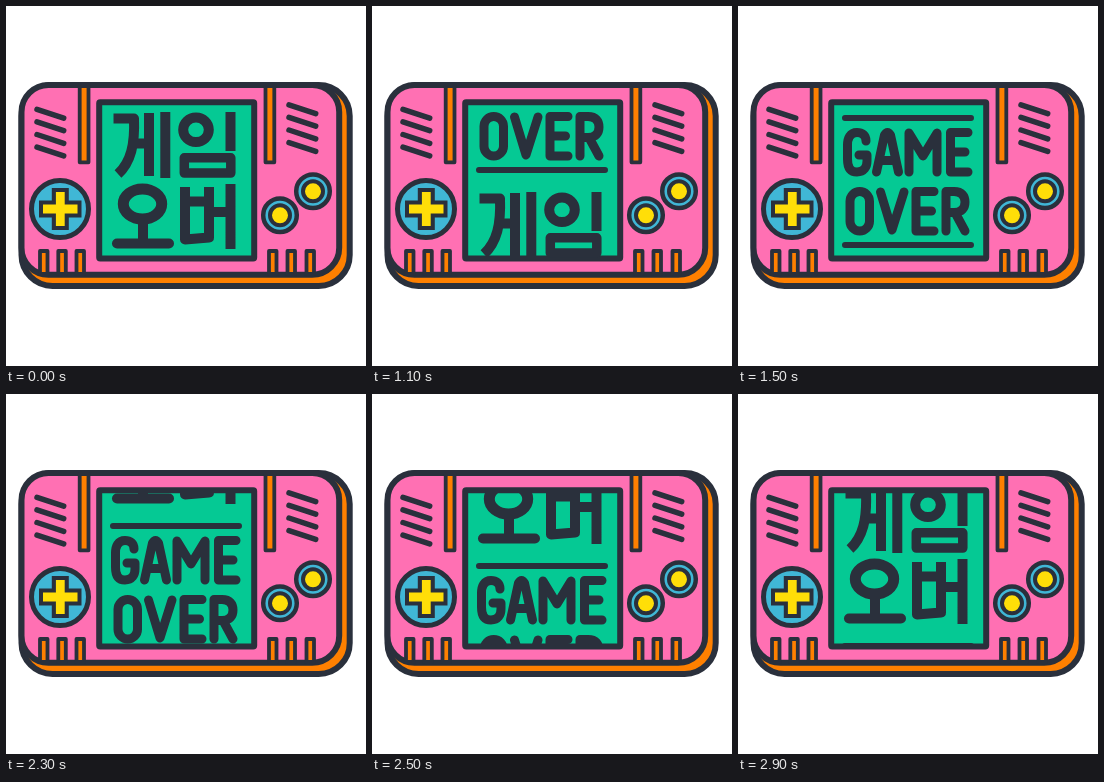
Write an HTML page that moves like this. It is 360x360 px and loops after 3 s.

```html
<!DOCTYPE html>
<html lang="ko">
<head>
<meta charset="utf-8">
<title>게임 오버 / Game Over</title>
<style>
  html, body { margin: 0; width: 100%; height: 100%; overflow: hidden; background: #fff; }
  svg { display: block; width: 100vw; height: 100vh; }
  .ink { fill: none; stroke: #2a303c; stroke-linejoin: round; }
  .round { stroke-linecap: round; }
</style>
</head>
<body>
<svg viewBox="0 0 360 360" role="img" aria-label="게임 오버, GAME OVER">
  <defs>
    <clipPath id="screen"><rect x="94" y="97" width="153" height="154.5"/></clipPath>
  </defs>

  <!-- shell -->
  <g stroke="#2a303c" stroke-width="6">
    <rect x="15.5" y="79" width="328.2" height="201" rx="31" fill="#ff8000"/>
    <rect x="15.5" y="79" width="317.7" height="189.7" rx="27" fill="#ff70b3"/>
  </g>
  <g id="slots" fill="#ff8000" stroke="#2a303c" stroke-width="3.8" stroke-linejoin="round"></g>
  <path id="vents" class="ink round" stroke-width="5.5"/>

  <!-- direction pad -->
  <circle cx="54" cy="203" r="28.5" fill="#40b7d6" stroke="#2a303c" stroke-width="5"/>
  <g fill="none">
    <path d="M33 203H75.5M54.3 182V224" stroke="#2a303c" stroke-width="17"/>
    <path d="M37 203H71.5M54.3 186V220" stroke="#ffde08" stroke-width="8.8"/>
  </g>
  <g id="buttons" stroke="#2a303c"></g>

  <!-- screen -->
  <rect x="93.2" y="96.2" width="155" height="156.3" rx="1" fill="#05c994" stroke="#2a303c" stroke-width="6"/>
  <g clip-path="url(#screen)">
    <g id="korean" class="ink" stroke-width="10">
      <path d="M107.5 112.5H128C129 138 125 156 112 168M129 137.5H143M143 107V170M159.3 106V172"/>
      <ellipse cx="190" cy="123.8" rx="12.8" ry="12.3"/>
      <path d="M224.5 106V145"/>
      <rect x="178.3" y="151.8" width="46.5" height="15.3" stroke-width="9.5"/>
      <ellipse cx="136.5" cy="198" rx="19.2" ry="15" stroke-width="11"/>
      <path d="M137 215V236"/>
      <path class="round" d="M111 237.5H163"/>
      <path d="M179 181V233.5L203 231.5V181M179 195.5H203M203 206H224M224.5 178V243"/>
    </g>
    <g id="english" class="ink round" stroke-width="9">
      <path d="M107 112H233M107 239H233" stroke-width="6"/>
      <path d="M128 135C128 129 124 126.5 119 126.5C112 126.5 109.5 132 109.5 139V153C109.5 161 112 166 119 166C126 166 129 161 129 155V149H121"/>
      <path d="M138.5 166L146.5 129Q149.5 124 152.5 129L160.5 166M142 154.5H157"/>
      <path d="M171 166V127L185 150L199 127V166"/>
      <path d="M230 126.5H212.5V166H230M212.5 146H227"/>
      <rect x="112" y="185.5" width="19.5" height="39.5" rx="9.75"/>
      <path d="M142.5 186L154 224L166 186"/>
      <path d="M196 185.5H178V225H196M178 205H193.5"/>
      <path d="M208 225V185.5H216C224 185.5 227 190 227 196C227 202 224 206.5 216 206.5H208M217 206.5L227 225"/>
    </g>
  </g>
</svg>
<script>
  const el = id => document.getElementById(id);
  const slot = (x, y, w, h) => `<rect x="${x}" y="${y}" width="${w}" height="${h}"/>`;

  el('slots').innerHTML =
    [73.7, 259.5].map(x => slot(x, 80, 8.8, 76.3)).join('') +
    [34, 52.3, 70.5, 263, 281.5, 300.5].map(x => slot(x, 245, 7.5, 23)).join('');

  const vents = (x, y) =>
    [0, 1, 2, 3].map(i => `M${x} ${y + i * 12.6}l26.7 8.8`).join('');
  el('vents').setAttribute('d', vents(31, 103.3) + vents(283, 98.8));

  const button = (x, y) =>
    `<circle cx="${x}" cy="${y}" r="16.8" fill="#40b7d6" stroke-width="4.5"/>` +
    `<circle cx="${x}" cy="${y}" r="10" fill="#ffde08" stroke-width="4"/>`;
  el('buttons').innerHTML = button(307, 185.3) + button(274, 209.3);

  const LOOP = 3000, HALF = 1500, HOLD = 800, STEP = 100, DROP = 20;
  const korean = el('korean'), english = el('english');
  const place = (node, y) => node.setAttribute('transform', `translate(0 ${y})`);

  // Each half holds one caption, then drops it in steps as the other enters from above.
  function draw(ms) {
    const t = ms % LOOP;
    const local = t % HALF;
    const y = local < HOLD ? 0 : DROP * (Math.floor((local - HOLD) / STEP) + 1);
    const first = t < HALF;
    place(korean, first ? y : y - 153);
    place(english, first ? y - 155 : y);
  }

  const start = performance.now();
  function tick() {
    draw(performance.now() - start);
    requestAnimationFrame(tick);
  }
  tick();
</script>
</body>
</html>
```
